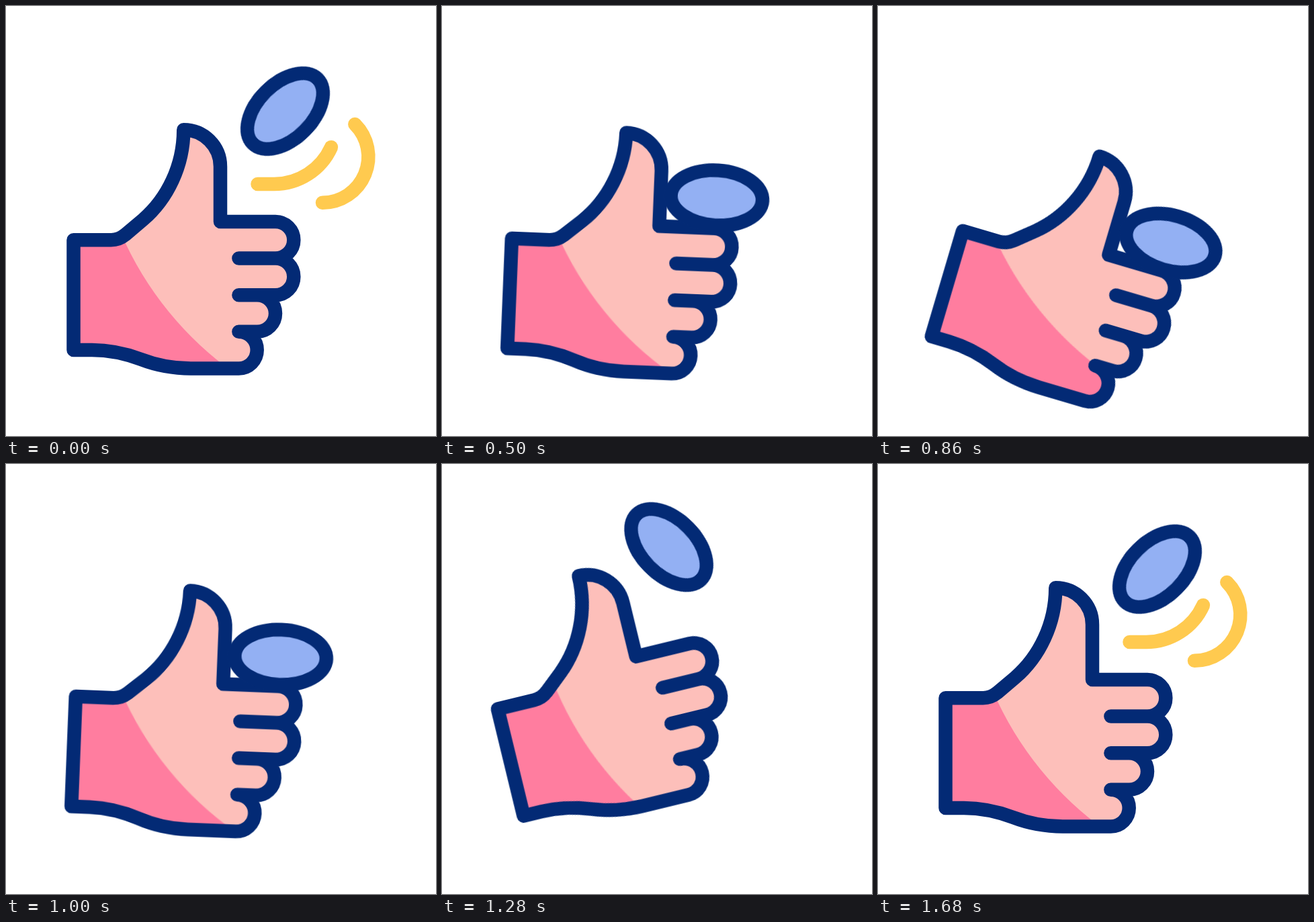
Animation, 640 px wide and 640 px high, one loop 2.4 s. Source, as an HTML page:

```html
<!DOCTYPE html>
<html lang="en">
<head>
<meta charset="utf-8">
<title>Coin toss</title>
<style>
  html, body { margin: 0; width: 100%; height: 100%; overflow: hidden; background: #fff; }
  svg { display: block; width: 100vw; height: 100vh; }

  .line { fill: none; stroke: #032a75; stroke-width: 20.5; stroke-linecap: round; stroke-linejoin: round; }
  .skin { fill: #fdbfba; }
  .shade { fill: #ff7d9f; }
  .coin { fill: #93b0f3; }
  .trail { fill: none; stroke: #ffca4f; stroke-width: 20.5; stroke-linecap: round; stroke-dasharray: 100 300; }

  .hand, .still, .x, .y, .coin, .trail {
    animation: 2.4s cubic-bezier(.333, 0, .667, 1) infinite;
  }
  .hand, .still { transform-origin: 160px 430px; }
  .hand { animation-name: swing; }
  .still { animation-name: unswing; }
  .x { animation-name: drift; }
  .y { animation-name: toss; }
  .coin { animation-name: spin; }
  .near { animation-name: near, near-show; animation-timing-function: cubic-bezier(.333, 0, .667, 1), step-end; }
  .far { animation-name: far, far-show; animation-timing-function: cubic-bezier(.333, 0, .667, 1), step-end; }

  @keyframes swing {
    0%, 16.667% { transform: rotate(0deg); }
    34.72% { transform: rotate(17deg); }
    49.58%, 51.04% { transform: rotate(-15.3deg); }
    62.5%, 100% { transform: rotate(0deg); }
  }
  /* cancels swing so the shadow edge stays in place */
  @keyframes unswing {
    0%, 16.667% { transform: rotate(0deg); }
    34.72% { transform: rotate(-17deg); }
    49.58%, 51.04% { transform: rotate(15.3deg); }
    62.5%, 100% { transform: rotate(0deg); }
  }
  @keyframes drift {
    0% { transform: translateX(415.5px); }
    14.17%, 47.21% { transform: translateX(402.7px); }
    58.54% { transform: translateX(406.5px); }
    69.46%, 100% { transform: translateX(415.5px); }
  }
  @keyframes toss {
    0% { transform: translateY(156.5px); }
    4.17% { transform: translateY(134px); }
    22.21%, 47.21% { transform: translateY(277.8px); }
    58.54% { transform: translateY(94.7px); }
    69.46%, 100% { transform: translateY(156.5px); }
  }
  @keyframes spin {
    0% { transform: rotate(-45deg); }
    22.21%, 47.21% { transform: rotate(-180deg); }
    69.46%, 100% { transform: rotate(135deg); }
  }
  @keyframes near {
    0%, 2.78% { stroke-dashoffset: 0; }
    13.89%, 30% { stroke-dashoffset: -100; }
    30.01%, 54.17% { stroke-dashoffset: 100; }
    65.33%, 100% { stroke-dashoffset: 0; }
  }
  @keyframes near-show {
    0% { opacity: 1; }
    13.89% { opacity: 0; }
    54.2%, 100% { opacity: 1; }
  }
  @keyframes far {
    0% { stroke-dashoffset: 0; }
    11.11%, 30% { stroke-dashoffset: -100; }
    30.01%, 57.21% { stroke-dashoffset: 100; }
    69.46%, 100% { stroke-dashoffset: 0; }
  }
  @keyframes far-show {
    0% { opacity: 1; }
    11.11% { opacity: 0; }
    57.25%, 100% { opacity: 1; }
  }
</style>
</head>
<body>
<svg viewBox="0 0 640 640">
  <defs>
    <path id="fist" d="M264.3 184.2A54.7 54.7 0 0 1 319 238.9V321H401
      a27.3 27.3 0 0 1 0 54.6H346.4H401
      a27.3 27.3 0 0 1 0 54.6H346.4H373.7
      a27.3 27.3 0 0 1 0 54.6H346.4
      a27.3 27.3 0 0 1 0 54.6H275
      C246 539.4 222 534 200.5 525.7C177 517 153 512 128 512
      H100.5V348.2H156.5Q168 348.2 178 340L204 318
      C240 287 264.3 238 264.3 184.2Z"/>
    <clipPath id="inside"><use href="#fist"/></clipPath>
  </defs>

  <path class="trail near" pathLength="100" d="M374.5 265H399A93.2 93.2 0 0 0 484 210.2"/>
  <path class="trail far" pathLength="100" d="M471 292.7A68.3 68.3 0 0 0 519.3 176.1"/>

  <g class="hand">
    <use class="skin" href="#fist"/>
    <g clip-path="url(#inside)">
      <path class="shade still" d="M151 292L171 338A500 500 0 0 0 342 548L383 577V640H0V292Z"/>
    </g>
    <use class="line" href="#fist"/>
    <g class="x"><g class="y">
      <ellipse class="line coin" rx="68.3" ry="41" style="fill:#93b0f3"/>
    </g></g>
  </g>
</svg>
</body>
</html>
```
